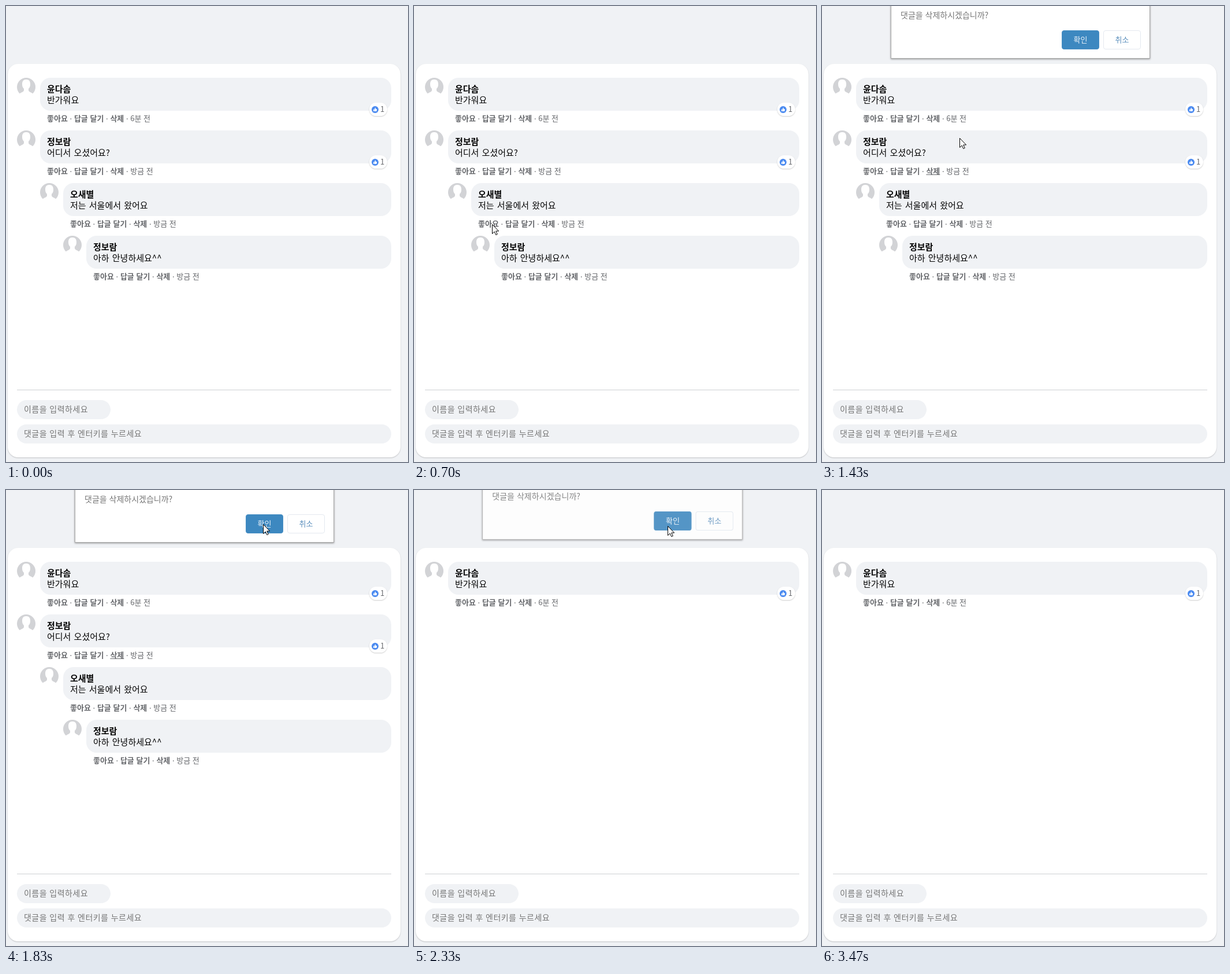
An HTML page that plays this animation: 696x788 px, repeating every 3.51 s.

```html
<!DOCTYPE html>
<html lang="ko">
<head>
<meta charset="utf-8">
<style>
html, body { margin: 0; width: 100%; height: 100%; overflow: hidden; }
body { position: relative; background: #f0f2f5; font: 15px/20px "Noto Sans CJK KR", "Noto Sans CJK JP", "Noto Sans CJK", sans-serif; color: #050505; }
div, svg { position: absolute; box-sizing: border-box; white-space: nowrap; }
#card { left: 3px; top: 100px; width: 680px; height: 680px; border-radius: 18px; background: #fff; box-shadow: 0 1px 2px #0003; }
#line { left: 19px; top: 663px; width: 648px; height: 1px; background: #ced0d4; }
.field { left: 19px; height: 33px; padding-left: 12px; border-radius: 17px; background: #f0f2f5; color: #757575; font-size: 14px; line-height: 31px; letter-spacing: .45px; }
.row { right: 29px; height: 91px; }
.bubble { left: 40px; right: 0; height: 57px; padding: 9px 12px; border-radius: 18px; background: #f0f2f5; line-height: 19px; word-spacing: 1px; }
.meta { left: 52px; top: 60px; font-size: 13px; color: #65676b; }
.meta i { position: relative; top: 1px; display: inline-block; width: 11px; text-align: center; font-style: normal; }
.badge { right: 7px; top: 43px; width: 31px; height: 23px; padding-left: 19px; border-radius: 12px; background: #fff; box-shadow: 0 1px 2px #0003; font-size: 13px; line-height: 21px; color: #65676b; }
.badge svg { left: 4px; top: 6px; }
#dialog { left: 119px; top: -60px; width: 449px; height: 151px; background: #fff; border: 1px solid #a8a8a8; box-shadow: 0 1px 3px #0006; }
#ask { left: 16px; top: 64px; font-size: 14px; color: #757575; }
.button { top: 101px; width: 65px; height: 33px; border-radius: 4px; font-size: 13px; font-weight: 500; line-height: 29px; text-align: center; border: 1px solid #e4e9f0; color: #5b8fbd; }
#ok { left: 295px; background: #3d88c0; border-color: #4a90c4; color: #eef4fa; }
#cancel { left: 367px; }
.pointer { left: 0; top: 0; overflow: visible; fill: #fff; stroke: #000; stroke-linejoin: round; }
</style>
</head>
<body>
<div id="card"></div>
<div id="first"></div>
<div id="thread"></div>
<div id="line"></div>
<div class="field" style="top:681px;width:162px">이름을 입력하세요</div>
<div class="field" style="top:723px;width:648px">댓글을 입력 후 엔터키를 누르세요</div>
<div id="dialog">
  <div id="ask">댓글을 삭제하시겠습니까?</div>
  <div id="ok" class="button">확인</div>
  <div id="cancel" class="button">취소</div>
</div>
<svg id="arrow" class="pointer" width="14" height="21"><path d="M.5.5V16.5L4.2 13L6.8 18.6L9.3 17.4L6.7 12H11.7Z"/></svg>
<svg id="hand" class="pointer" width="20" height="24"><path d="M-2 12V1.5Q-2-.5-.3-.5T1.5 1.5V7.5Q3 6 4.5 8Q6 6.8 7.5 8.8Q10.5 8 10.5 11V15Q10.5 17 8.5 19V22H-1V19.5L-6 13Q-7.5 10.5-5.5 10Q-4 10-2 12.5M1.5 7.5V11M4.5 8V11.5M7.5 9V12"/></svg>
<script>
const LOOP = 3510, OPEN_AT = 1100, DELETE_AT = 2300, CLOSE_AT = 2308, FADE = 180;
const $ = id => document.getElementById(id);
const clamp = v => Math.max(0, Math.min(1, v));

const avatar = `<svg width="32" height="32"><circle cx="16" cy="16" r="16" fill="#d2d3d6"/>
  <path fill="#fff" d="M16 3C11 3 9 6 9 11C9 15 10 17 12 19V22C11 25 7 25 4 28V32H28V28C25 25 21 25 20 22V19C22 17 23 15 23 11C23 6 21 3 16 3Z"/></svg>`;
const badge = `<div class="badge"><svg width="12" height="12"><circle cx="6" cy="6" r="6" fill="#4a8af0"/>
  <path fill="#fff" d="M3 5.5H4.5V9H3ZM5 5.5L6.2 2.6Q7.4 2.8 7 5H9.2L8.6 9H5Z"/></svg>1</div>`;

function comment(index, indent, name, text, when, liked) {
  return `<div class="row" style="top:${124 + 91 * index}px;left:${19 + 40 * indent}px;width:${648 - 40 * indent}px">
    ${avatar}<div class="bubble"><b>${name}</b><br>${text}</div>${liked ? badge : ''}
    <div class="meta"><b>좋아요</b><i>·</i><b>답글 달기</b><i>·</i><b class="delete">삭제</b><i>·</i>${when}</div></div>`;
}
$('first').innerHTML = comment(0, 0, '윤다솜', '반가워요', '6분 전', true);
$('thread').innerHTML = comment(1, 0, '정보람', '어디서 오셨어요?', '방금 전', true)
  + comment(2, 1, '오새별', '저는 서울에서 왔어요', '방금 전')
  + comment(3, 2, '정보람', '아하 안녕하세요^^', '방금 전');
const deleteLink = $('thread').querySelector('.delete');

const easeOut = k => 1 - (1 - k) ** 3;
const easeIn = k => k ** 3;
const easeBoth = k => k * k * (3 - 2 * k);

// Pointer stops: time, x, y, easing towards the stop
const path = [
  [580, 120, 800],
  [850, 186, 291, easeOut],
  [1340, 186, 291, easeBoth],
  [1640, 420, 4, easeBoth],
  [1780, 445, 59, easeBoth],
  [1950, 445, 59, easeBoth],
  [2150, 439, 62, easeBoth],
  [2800, 439, 62, easeBoth],
  [3060, 425, 800, easeIn]
];
function pointerAt(t) {
  const next = path.findIndex(stop => stop[0] > t);
  if (next < 1) return [0, -100];
  const [t0, x0, y0] = path[next - 1], [t1, x1, y1, ease] = path[next];
  const k = ease((t - t0) / (t1 - t0));
  // The way in bends: sideways motion lags behind the climb
  const kx = ease === easeOut ? k ** 8 : k;
  return [x0 + (x1 - x0) * kx, y0 + (y1 - y0) * k];
}

function draw() {
  const t = performance.now() % LOOP;
  const [x, y] = pointerAt(t);
  const onLink = t < DELETE_AT && x > 179 && x < 204 && y > 278 && y < 294;
  for (const [id, on] of [['arrow', !onLink], ['hand', onLink]]) {
    $(id).style.display = on ? '' : 'none';
    $(id).style.transform = `translate(${Math.round(x)}px, ${Math.round(y)}px)`;
  }

  const shown = clamp((t - OPEN_AT) / FADE) * (1 - clamp((t - CLOSE_AT) / FADE));
  const away = 1 - shown;
  $('dialog').style.opacity = shown;
  $('dialog').style.transform = `translateY(${-40 * away}px) scale(${1 + .03 * away}, 1)`;

  deleteLink.style.textDecoration = onLink || t > OPEN_AT ? 'underline' : 'none';
  $('thread').style.display = t < DELETE_AT ? '' : 'none';
  requestAnimationFrame(draw);
}
draw();
</script>
</body>
</html>
```
